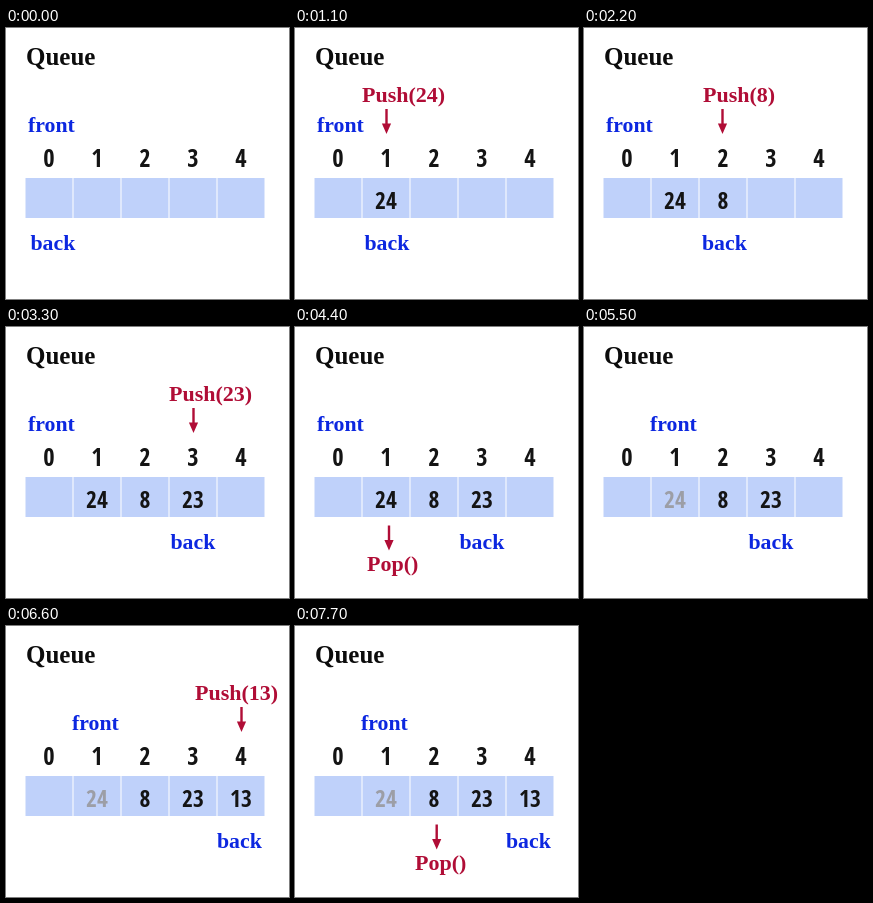
Write an HTML page that moves like this. It is 283x271 px and loops after 8000 ms.

```html
<!DOCTYPE html>
<html lang="en">
<head>
<meta charset="utf-8">
<title>Queue</title>
<style>
  html, body { margin: 0; width: 100%; height: 100%; overflow: hidden; background: #fff; }
  svg { display: block; width: 100%; height: 100%; }
  text { font: 700 22px "Liberation Serif", serif; }
  .title { font-size: 25px; fill: #0c0c0c; }
  .pointer { font-size: 21.8px; fill: #0c27e0; }
  .action { fill: #b00d36; }
  .digit {
    font: 700 24.5px "Open Sans Condensed", "Roboto Condensed", "Open Sans", sans-serif;
    font-stretch: 75%;
    text-anchor: middle;
    fill: #141414;
  }
  .value { font-size: 23.5px; font-weight: 600; }
  .popped { fill: #9c9ea6; }
  .cell { fill: #bfd1fa; }
</style>
</head>
<body>
<svg viewBox="0 0 283 271"></svg>
<script>
const STEP = 1100, LOOP = 8000;
const FRONT_X = [22, 66];
const BACK_X = [24.5, 69.5, 118, 164.5, 211];
const VALUES = ['', 24, 8, 23, 13];

// front and back are cell indices; an action names the cell it touches
const steps = [
  { front: 0, back: 0 },
  { front: 0, back: 1, push: 1, x: 67, arrow: 91.5 },
  { front: 0, back: 2, push: 2, x: 119, arrow: 138.5 },
  { front: 0, back: 3, push: 3, x: 163, arrow: 187.5 },
  { front: 0, back: 3, pop: 1, x: 72, arrow: 94 },
  { front: 1, back: 3 },
  { front: 1, back: 4, push: 4, x: 189, arrow: 235.5 },
  { front: 1, back: 4, pop: 2, x: 120, arrow: 141.7 }
];

const svg = document.querySelector('svg');
const cellX = i => 19.5 + 48 * i;
const label = (cls, x, y, content) => `<text class="${cls}" x="${x}" y="${y}">${content}</text>`;
const digit = (i, y, content, cls = '') => label('digit ' + cls, cellX(i) + 23.5, y, content);
const arrow = (x, y) =>
  `<path class="action" d="M${x - 1.2} ${y}h2.4v14.5h3.4l-4.6 10.5l-4.6 -10.5h3.4z"/>`;

function draw({ front, back, push, pop, x, arrow: arrowX }) {
  let out = label('title', 20, 37, 'Queue')
    + label('pointer', FRONT_X[front], 103.6, 'front')
    + label('pointer', BACK_X[back], 221.6, 'back');
  VALUES.forEach((value, i) => {
    out += `<rect class="cell" x="${cellX(i)}" y="150" width="47" height="40"/>`
      + digit(i, 139, i);
    if (i && i <= back) out += digit(i, 180.7, value, i <= front ? 'value popped' : 'value');
  });
  if (push) out += label('action', x, 74.4, `Push(${VALUES[push]})`) + arrow(arrowX, 81);
  if (pop) out += label('action', x, 244, 'Pop()') + arrow(arrowX, 198.5);
  svg.innerHTML = out;
}

let shown = -1;
function tick() {
  const index = Math.floor(performance.now() % LOOP / STEP);
  if (index !== shown) draw(steps[shown = index]);
  requestAnimationFrame(tick);
}
tick();
</script>
</body>
</html>
```
